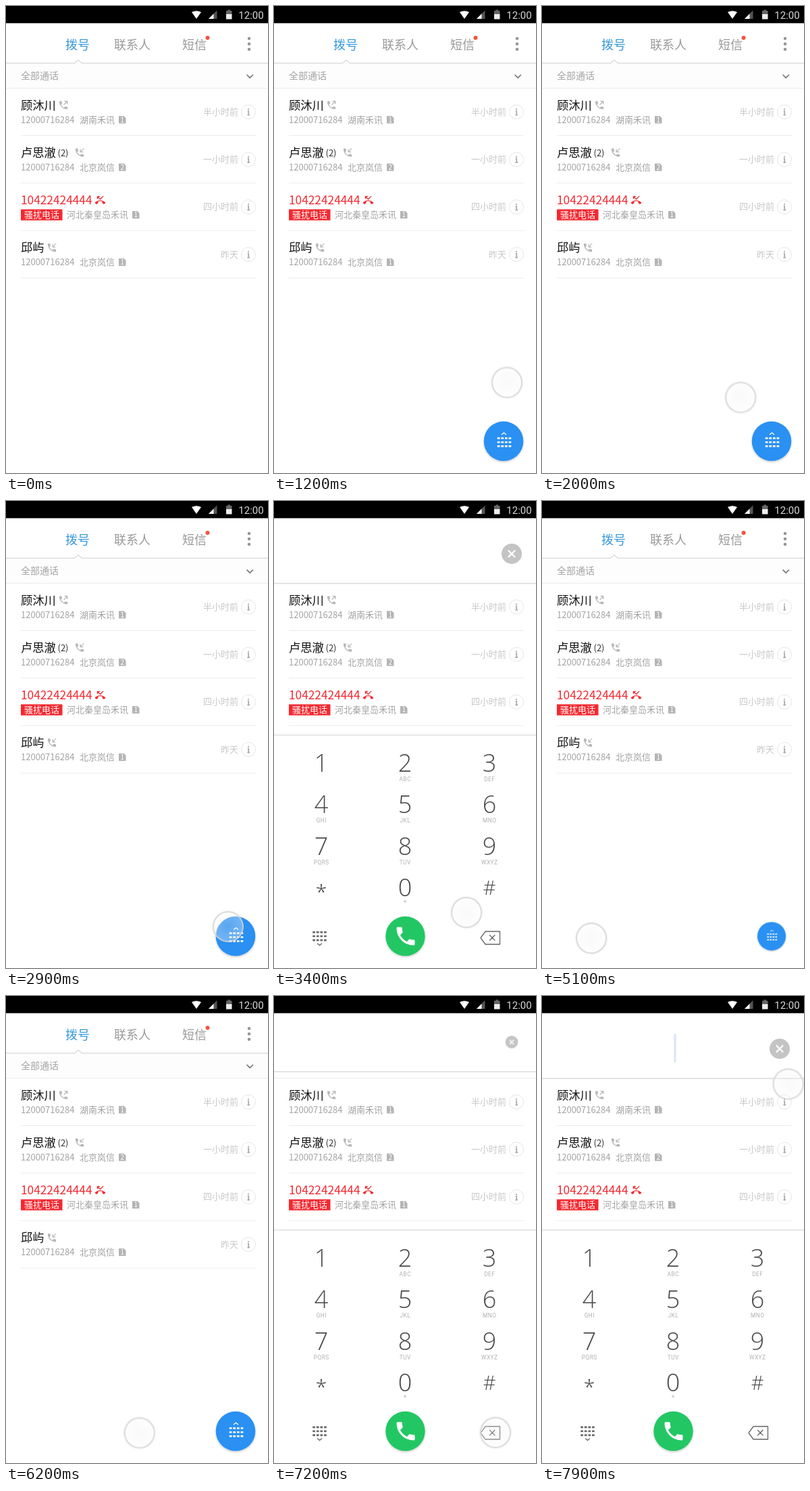
Write an HTML page that moves like this. It is 388x690 px and loops after 8 s.

```html
<!DOCTYPE html>
<html lang="zh-CN">
<head>
<meta charset="utf-8">
<title>拨号</title>
<style>
html, body { margin: 0; width: 100%; height: 100%; overflow: hidden; background: #fff; }
#stage { position: absolute; left: 0; top: 0; width: 388px; height: 690px; overflow: hidden; }
svg { display: block; }
text { font-family: "Noto Sans CJK SC", "Noto Sans CJK", sans-serif; font-weight: 300; }
.mid { text-anchor: middle; }
.digit { font: 350 36px "Open Sans", "Noto Sans", sans-serif; fill: #4a4a4a; }
.letters { font: 400 8.3px Roboto, sans-serif; letter-spacing: .5px; fill: #b0b0b0; }
.clock { font: 400 15px Roboto, sans-serif; fill: #d8d8d8; }
.line { fill: none; stroke-linecap: round; stroke-linejoin: round; }

#pad    { animation: pad 8s infinite; }
#dial   { animation: dial 8s infinite; }
#clear  { animation: clear 8s infinite; transform-origin: 352px 78px; }
#fab    { animation: fab 8s infinite; transform-origin: 340px 643px; }
#caret  { animation: caret 8s linear infinite; }
#touch {
  position: absolute; left: 0; top: 0; width: 46px; height: 46px; box-sizing: border-box;
  border: 2px solid rgba(212, 212, 212, .8); border-radius: 50%;
  background: radial-gradient(rgba(232, 232, 232, .25), rgba(250, 250, 250, .35) 70%);
  box-shadow: 0 0 3px rgba(0, 0, 0, .12);
  offset-path: path("M362 549L294 578L329 629Q230 563 73 646L328 645Q395 290 361 108");
  offset-rotate: 0deg;
  animation: move 8s cubic-bezier(.37, 0, .63, 1) infinite, show 8s linear infinite;
}

@keyframes pad {
  0%, 36.625%, 62%, 88.25% { transform: translateY(350px); }
  36.625%, 88.25% { animation-timing-function: cubic-bezier(.33, 1, .68, 1); }
  38.375%, 58.5%, 90%, 100% { transform: none; }
  58.5% { animation-timing-function: cubic-bezier(.4, 0, .6, 1); }
}
@keyframes dial {
  0%, 36.625%, 62.5%, 88.25% { transform: translateY(-38px); opacity: 0; }
  36.63%, 62.49%, 88.26% { opacity: 1; }
  36.63%, 88.26% { transform: translateY(-38px); animation-timing-function: cubic-bezier(.33, 1, .68, 1); }
  41.5%, 58.5%, 93.125%, 100% { transform: none; opacity: 1; }
}
@keyframes clear {
  0%, 36.625%, 61.5%, 88.25% { transform: scale(0); }
  36.625%, 88.25% { animation-timing-function: cubic-bezier(.33, 1, .68, 1); }
  41.5%, 58.5%, 93.125%, 100% { transform: scale(1); }
}
@keyframes fab {
  0%, 10.6%, 38.4%, 61.9%, 90%, 100% { transform: scale(0); }
  10.6%, 61.9% { animation-timing-function: cubic-bezier(.33, 1, .68, 1); }
  15%, 36.625%, 66.25%, 88.25% { transform: scale(1); }
}
@keyframes caret {
  0%, 45.6%, 51.25%, 55.6%, 58.75%, 97.75% { opacity: 0; }
  46.5%, 50%, 56.9%, 58.5%, 99.2%, 100% { opacity: 1; }
}
@keyframes move {
  0%, 12.5% { offset-distance: 0px; }
  20%, 24.5% { offset-distance: 73.9px; }
  34%, 38.5% { offset-distance: 135.8px; }
  52.75%, 71.1% { offset-distance: 405.7px; }
  84.1%, 90.6% { offset-distance: 660.7px; }
  100% { offset-distance: 100%; }
}
@keyframes show {
  0%, 11% { opacity: 0; }
  14%, 100% { opacity: 1; }
}
</style>
</head>
<body>
<div id="stage">
<svg width="388" height="690" viewBox="0 0 388 690">
  <defs>
    <path id="phone" d="M6.62 10.79c1.44 2.83 3.76 5.14 6.59 6.59l2.2-2.2c.27-.27.67-.36 1.02-.24 1.12.37 2.33.57 3.57.57.55 0 1 .45 1 1V20c0 .55-.45 1-1 1-9.39 0-17-7.61-17-17 0-.55.45-1 1-1h3.5c.55 0 1 .45 1 1 0 1.25.2 2.45.57 3.57.11.35.03.74-.25 1.02z"/>
    <g id="out"><use href="#phone"/><path class="line" stroke="currentColor" stroke-width="1.8" d="M13.5 10.5l7-7M15 3.5h5.5V9"/></g>
    <g id="in"><use href="#phone"/><path class="line" stroke="currentColor" stroke-width="1.8" d="M20.5 3.5l-7 7M13.5 5v5.5H19"/></g>
    <g id="missed">
      <path d="M1 16.5Q12 7.5 23 16.5q1 .9 0 1.8l-2 2q-.8.8-1.7.1l-2.2-1.6q-.6-.5-.6-1.2v-2.9q-4.500-1.400-9 0v2.900q0 .7-.6 1.200l-2.200 1.600q-.9.7-1.700-.1l-2-2q-1-.9 0-1.800z"/>
      <path class="line" stroke="currentColor" stroke-width="1.8" d="M6 8.500V4h4.500M6 4l6 6 6.500-6.500"/>
    </g>
    <g id="grid"></g>
    <linearGradient id="lift" x2="0" y2="1"><stop stop-color="#000" stop-opacity="0"/><stop offset="1" stop-color="#000" stop-opacity=".12"/></linearGradient>
    <filter id="drop" x="-30%" y="-30%" width="160%" height="160%"><feDropShadow dx="0" dy="1.5" stdDeviation="1.5" flood-opacity=".22"/></filter>
  </defs>

  <rect y="85" width="388" height="36" fill="#fdfdfd"/>
  <path d="M0 84.5H101.5L107 80l5.5 4.5H388" fill="none" stroke="#dcdcdc" stroke-width="1.4"/>
  <path d="M0 121.5H388" stroke="#ebebeb"/>
  <g font-size="18" fill="#999">
    <text x="88" y="63.5" fill="#3498db" style="font-weight:400">拨号</text>
    <text x="160" y="63.5">联系人</text>
    <text x="261" y="63.5">短信</text>
  </g>
  <circle cx="298.5" cy="47" r="3" fill="#f4523f"/>
  <g fill="#969696"><circle cx="360" cy="48" r="2.3"/><circle cx="360" cy="56" r="2.3"/><circle cx="360" cy="64" r="2.3"/></g>
  <text x="22" y="108" font-size="14" fill="#a4a4a4">全部通话</text>
  <path class="line" d="M357 102l4.2 4.2 4.2-4.2" stroke="#777" stroke-width="1.7"/>
  <g id="calls"></g>

  <g id="fab">
    <circle cx="340" cy="643" r="29.3" fill="#2990f2" filter="url(#drop)"/>
    <use href="#grid" x="341" y="644.5" fill="#fff"/>
    <path class="line" d="M337.5 633l3-2.5 3 2.5" stroke="#fff" stroke-width="1.3"/>
  </g>

  <g id="dial">
    <rect y="-20" width="388" height="142" fill="#fff"/>
    <rect y="121" width="388" height="1.5" fill="#dcdcdc"/>
    <rect id="caret" x="195.5" y="56" width="3" height="42" fill="#c8d9fb"/>
    <g id="clear">
      <circle cx="352" cy="78" r="15" fill="#c4c4c4"/>
      <path class="line" d="M347.5 73.5l9 9m0-9l-9 9" stroke="#fff" stroke-width="2.4"/>
    </g>
  </g>

  <g id="pad">
    <rect y="343" width="388" height="4.5" fill="url(#lift)"/>
    <rect y="347" width="388" height="343" fill="#fff"/>
    <g id="keys"></g>
    <use href="#grid" x="67.5" y="643" fill="#666"/>
    <path class="line" d="M64.5 654l3 2.5 3-2.5" stroke="#666" stroke-width="1.3"/>
    <circle cx="194.5" cy="643" r="29.2" fill="#22c763" filter="url(#drop)"/>
    <use href="#phone" transform="translate(195 643) scale(1.5) translate(-12 -12)" fill="#fff"/>
    <path class="line" d="M306 645.5l7-9.5h21.5v19H313zM319.5 641.5l7.5 7.5m0-7.5l-7.5 7.5" stroke="#666" stroke-width="1.3"/>
  </g>

  <rect width="388" height="25.4" fill="#000"/>
  <path d="M275 9q7-3.500 14 0l-7 10z" fill="#fff"/>
  <path d="M300 19h12.5V6.5z" fill="#555"/>
  <path d="M300 19h7.5v-7.5z" fill="#fff"/>
  <path d="M326 7h2.5V5.5h3.5V7h2.5v5.5H326z" fill="#666"/>
  <path d="M326 12h8.5v7.5H326z" fill="#eee"/>
  <text class="clock" x="344.3" y="18.5">12:00</text>
</svg>
<div id="touch"></div>
</div>
<script>
const $ = id => document.getElementById(id);

const calls = [
  { name: "顾沐川", icon: "out", at: 85, num: "12000716284", area: "湖南禾讯", sim: 1, when: "半小时前" },
  { name: "卢思澈", icon: "in", at: 109, num: "12000716284", area: "北京岚信", sim: 2, when: "一小时前", count: "(2)" },
  { name: "10422424444", icon: "missed", at: 139.5, tag: "骚扰电话", area: "河北秦皇岛禾讯", sim: 1, when: "四小时前" },
  { name: "邱屿", icon: "in", at: 68, num: "12000716284", area: "北京岚信", sim: 1, when: "昨天" }
];

function callRow(c, i) {
  const red = "#f5282f", tint = c.tag ? red : "#b8b8b8";
  const areaX = c.tag ? 90 : 109, simX = areaX + c.area.length * 13 + 6;
  const lead = c.tag
    ? `<rect x="22" y="179.5" width="61.5" height="16.3" fill="${red}"/><text x="27" y="192.3" fill="#fff" style="font-weight:400">${c.tag}</text>`
    : `<text x="22" y="192.3">${c.num}</text>`;
  return `<g transform="translate(0 ${i * 70.2 - 19.5})" font-size="13" fill="#a2a2a2">
    <text x="22" y="172.3" font-size="17.3" fill="${c.tag ? red : "#111"}" style="font-weight:${c.tag ? 300 : 400}">${c.name}</text>
    ${c.count ? `<text x="76.5" y="171" font-size="13" fill="#333">${c.count}</text>` : ""}
    <use href="#${c.icon}" transform="translate(${c.at} 166) scale(.68) translate(-12 -12)" fill="${tint}" color="${tint}"/>
    ${lead}
    <text x="${areaX}" y="192.3">${c.area}</text>
    <path d="M${simX} 182h7.5l3 3v8h-10.5z" fill="#b4b4b4"/>
    <text class="mid" x="${simX + 5.2}" y="191.2" font-size="10" fill="#fff" style="font-weight:500">${c.sim}</text>
    <text x="344" y="180.5" text-anchor="end" fill="#c8c8c8">${c.when}</text>
    <circle cx="359" cy="176" r="10.5" fill="none" stroke="#e6e6e6"/>
    <path d="M359 171v2.2M357.8 175h1.4v5.5m-1.8 0h3.6" fill="none" stroke="#a8a8a8" stroke-width="1.7"/>
    <path d="M22 211H370" stroke="#ececec"/>
  </g>`;
}

function key(label, i) {
  const [digit, letters = ""] = label.split(" ");
  const x = [70, 194, 319][i % 3], y = 387 + 61.4 * (i / 3 | 0);
  const size = { "*": 30, "#": 29 }[digit] || 36;
  const base = digit === "*" ? y + 17 : y + size * .357;
  return `<text class="digit mid" x="${x}" y="${base}" style="font-size:${size}px">${digit}</text>
    <text class="letters mid" x="${x + .3}" y="${y + 27}"${letters === "+" ? ' dy="-3"' : ""}>${letters}</text>`;
}

const labels = ["1", "2 ABC", "3 DEF", "4 GHI", "5 JKL", "6 MNO", "7 PQRS", "8 TUV", "9 WXYZ", "*", "0 +", "#"];
$("calls").innerHTML = calls.map(callRow).join("");
$("keys").innerHTML = labels.map(key).join("");
$("grid").innerHTML = Array.from({ length: 12 }, (_, i) =>
  `<rect x="${i % 4 * 5.6 - 10.3}" y="${(i / 4 | 0) * 5.9 - 7.2}" width="3.8" height="2.6" rx=".4"/>`).join("");
</script>
</body>
</html>
```
